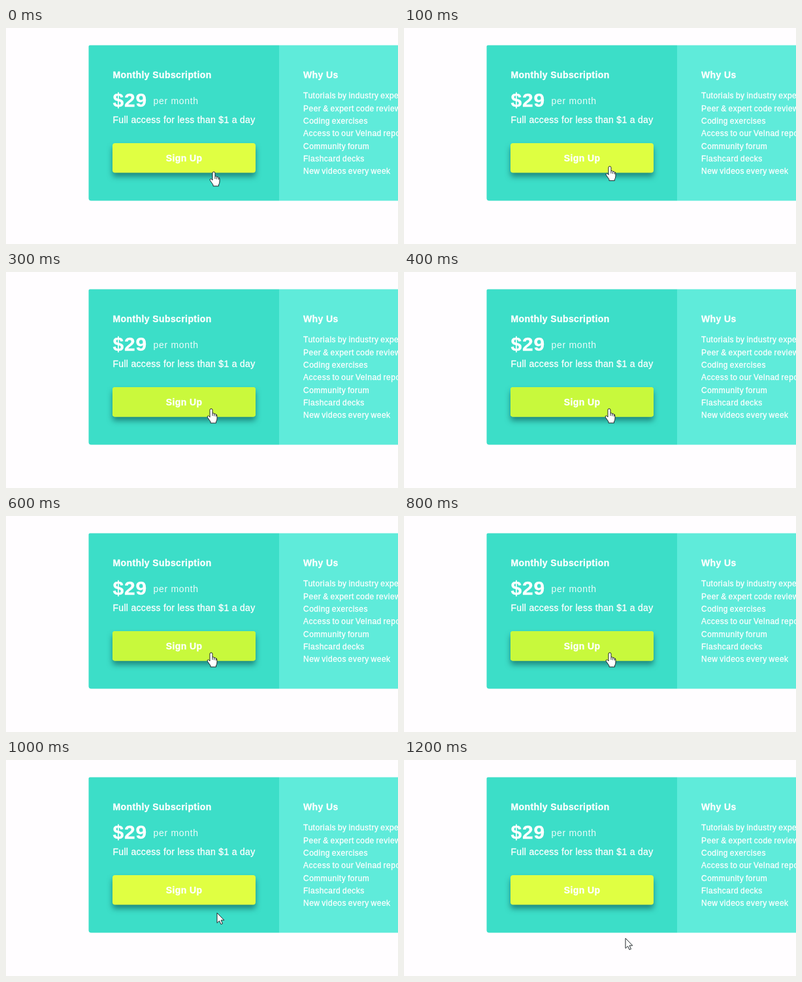
An HTML page for the animation above (1300 ms loop, 600 by 332 pixels).

```html
<!DOCTYPE html>
<html lang="en">
<head>
<meta charset="utf-8">
<title>Subscription card</title>
<style>
  html, body { margin: 0; width: 100%; height: 100%; overflow: hidden; background: #fffdff; }
  svg { display: block; width: 600px; height: 332px; }
  text { font: 14px "Liberation Sans", Arial, sans-serif; letter-spacing: .3px; fill: #fff; stroke: #fff; stroke-width: .3; }
  .bold { font-weight: 700; letter-spacing: .4px; }
  .price { font-size: 30px; font-weight: 700; letter-spacing: .8px; }
  .unit { letter-spacing: .7px; fill-opacity: .9; stroke: none; }
  .list text { font-size: 12px; letter-spacing: .5px; word-spacing: -1px; }
  #button { filter: drop-shadow(0 6px 4.5px rgba(0, 55, 55, .5)); }
  .cursor { fill: #fff; stroke: #20262b; stroke-linejoin: round; }
</style>
</head>
<body>
<svg viewBox="0 0 600 332">
  <path d="M418 26.5H128.5a2 2 0 0 0-2 2V261.4a4 4 0 0 0 4 4H418Z" fill="#3cdec8"/>
  <path d="M418 26.5H600V265.4H418Z" fill="#5febda"/>

  <text class="bold" x="163.5" y="77">Monthly Subscription</text>
  <text class="price" x="163.5" y="121">$29</text>
  <text class="unit" x="225.5" y="117">per month</text>
  <text x="163.5" y="146">Full access for less than $1 a day</text>

  <g id="button">
    <rect x="163" y="177" width="219" height="45.5" rx="4" fill="#e0ff42"/>
    <rect id="hover" x="163" y="177" width="219" height="45.5" rx="4" fill="#c8f93c"/>
  </g>
  <text class="bold" x="272.5" y="205" text-anchor="middle">Sign Up</text>

  <text class="bold" x="455" y="77">Why Us</text>
  <g class="list" id="list"></g>

  <g id="pointer" class="cursor">
    <g id="hand">
      <path d="M-2 2Q-2 0 0 0Q2 0 2 2V7Q4 6 4.8 8Q6.7 7 7.5 9Q9 8.5 9 11V15Q9 18 7.5 20V22H-1V20L-5.5 13.5Q-6.5 11-4.5 10.8Q-3.5 11-2 13Z"/>
      <path d="M2 7V11M4.8 8V11.5M7.5 9V12" fill="none"/>
    </g>
    <path id="arrow" d="M0 0V15.5L3.6 12.2L6 17.6L8.5 16.5L6.1 11.2H10.8Z"/>
  </g>
</svg>
<script>
  const LOOP = 1300, STEP = 100, LEAVE = 1000;
  const $ = id => document.getElementById(id);

  const benefits = [
    "Tutorials by industry experts", "Peer & expert code reviews",
    "Coding exercises", "Access to our Velnad repos",
    "Community forum", "Flashcard decks", "New videos every week"
  ];
  benefits.forEach((label, i) => {
    const line = document.createElementNS("http://www.w3.org/2000/svg", "text");
    line.setAttribute("x", 455);
    line.setAttribute("y", 108.3 + 19.3 * i);
    line.textContent = label;
    $("list").append(line);
  });

  function smoothstep(from, to, t) {
    const u = Math.min(1, Math.max(0, (t - from) / (to - from)));
    return u * u * (3 - 2 * u);
  }

  // The pointer settles on the button, rests, then drifts right and drops away.
  function pointerAt(t) {
    const settle = Math.exp(-t / 70);
    const drift = Math.max(0, (t - 700) / 500);
    const drop = Math.max(0, t - 872);
    return [314 + 4 * settle + 25 * drift ** 2, 210 + 11 * settle + 0.195 * drop];
  }

  function render(now) {
    const t = Math.floor((now % LOOP) / STEP) * STEP;
    const inside = t < LEAVE;
    $("hand").style.display = inside ? "" : "none";
    $("arrow").style.display = inside ? "none" : "";
    $("pointer").setAttribute("transform", `translate(${pointerAt(t)})`);
    $("hover").setAttribute("opacity", inside ? smoothstep(50, 350, t) : 0);
  }

  const start = performance.now();
  function tick() {
    render(performance.now() - start);
    requestAnimationFrame(tick);
  }
  tick();
</script>
</body>
</html>
```
